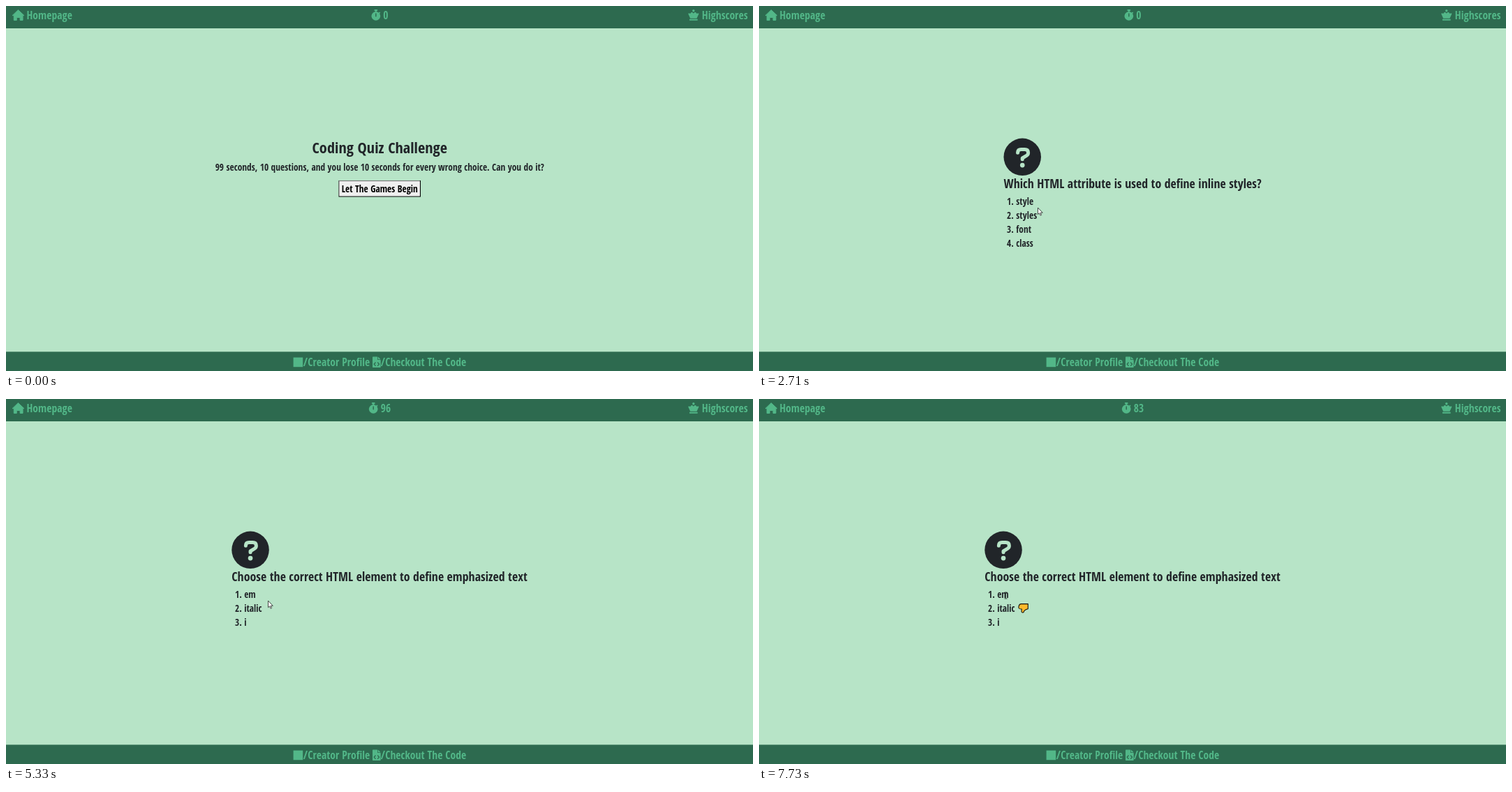
These frames come from a looping animation (1070 px wide and 523 px high, 8000 ms). An HTML page with a canvas:

```html
<!DOCTYPE html>
<html lang="en">
<head>
<meta charset="utf-8">
<title>Coding Quiz Challenge</title>
<style>
  html, body { margin: 0; width: 100%; height: 100%; overflow: hidden; background: #b7e4c7; }
  canvas { display: block; }
</style>
</head>
<body>
<canvas id="stage" width="1070" height="523"></canvas>
<script>
const ctx = document.getElementById("stage").getContext("2d");
const WIDTH = 1070, HEIGHT = 523, CENTER = WIDTH / 2 + .3;
const LOOP = 8000, BEGIN = 1740, SECOND = 993, NEXT_QUESTION = 4050, WRONG_ANSWER = 6070;
const REM = 16 * WIDTH / 1920;
const FAMILY = '"Open Sans Condensed", "Open Sans", "Noto Sans", sans-serif';
const MINT = "#b7e4c7", PINE = "#2d6a4f", LEAF = "#52b788", INK = "#212529";
const LIST_TOP = 269.7, ROW = 2.25 * REM, INDENT = 2 * REM;

const questions = [
  { x: 350.5, text: "Which HTML attribute is used to define inline styles?", items: ["style", "styles", "font", "class"] },
  { x: 323.3, text: "Choose the correct HTML element to define emphasized text", items: ["em", "italic", "i"] }
];

// Each trip bends towards a point, ends at a stop and clicks there
const entry = [929, 486];
const trips = [
  { from: 120, to: 1000, bend: [621, 403], stop: [571, 263], click: 1650 },
  { from: 2200, to: 2980, bend: [418, 306], stop: [386, 284], click: 3450 },
  { from: 5120, to: 5870, bend: [371, 292], stop: [357, 299], click: 6000 },
  { from: 6740, to: 7180, bend: [355, 290], stop: [353.5, 281.5], click: 7380 }
];

function setFont(rem) {
  ctx.font = `condensed 700 ${rem * REM}px ${FAMILY}`;
  ctx.fontStretch = "condensed";
  ctx.letterSpacing = ".04px";
}

function label(text, x, y, rem, color, align = "left") {
  setFont(rem);
  ctx.fillStyle = color;
  ctx.textAlign = align;
  ctx.fillText(text, x, y);
}

function textWidth(text, rem) {
  setFont(rem);
  return ctx.measureText(text).width;
}

function rect(x, y, w, h, color) {
  ctx.fillStyle = color;
  ctx.fillRect(x, y, w, h);
}

function disc(x, y, r, color) {
  ctx.fillStyle = color;
  ctx.beginPath();
  ctx.arc(x, y, r, 0, 2 * Math.PI);
  ctx.fill();
}

function fill(path, color) {
  ctx.fillStyle = color;
  ctx.fill(new Path2D(path));
}

function stroke(path, color, width) {
  ctx.strokeStyle = color;
  ctx.lineWidth = width;
  ctx.lineCap = ctx.lineJoin = "round";
  ctx.stroke(new Path2D(path));
}

function outlined(path, color, edge, width) {
  fill(path, color);
  stroke(path, edge, width);
}

function at(x, y, scale, draw) {
  ctx.save();
  ctx.translate(x, y);
  ctx.scale(scale, scale);
  draw();
  ctx.restore();
}

// Icons are drawn on a 512 unit em square
const icon = (draw, x, y, rem = 1.75) => at(x, y, rem * REM / 512, draw);

function house() {
  outlined("M288 18 L558 272 H498 V496 H368 V368 H208 V496 H78 V272 H18 Z", LEAF, LEAF, 32);
}

function stopwatch() {
  stroke("M176 32 H272 M224 32 V120 M350 190 L396 148", LEAF, 64);
  disc(224, 304, 208, LEAF);
  stroke("M224 192 V320", PINE, 48);
}

function queen() {
  disc(256, 56, 56, LEAF);
  fill("M104 416 L4 195 L46 168 Q128 220 148 128 H204 Q256 224 308 128 H364 Q384 220 466 168 L508 195 L408 416 Z", LEAF);
  rect(64, 448, 384, 64, LEAF);
}

function codeFile() {
  outlined("M24 24 H208 V176 H360 V488 H24 Z", LEAF, LEAF, 48);
  fill("M256 0 L384 128 H256 Z", LEAF);
  stroke("M136 280 L72 352 L136 424 M248 280 L312 352 L248 424", PINE, 44);
}

function questionMark() {
  disc(256, 256, 256, INK);
  stroke("M192 198 Q192 152 238 152 H289 Q336 152 336 198 Q336 224 313 238 L256 272 V288", MINT, 48);
  disc(256, 368, 32, MINT);
}

function drawBars(seconds) {
  rect(0, 0, WIDTH, 32, PINE);
  rect(0, 495.4, WIDTH, HEIGHT, PINE);
  icon(house, 8.9, 5.3);
  label("Homepage", 29.4, 19.2, 1.75, LEAF);
  const left = CENTER - (ICON_GAP + textWidth(seconds, 1.75)) / 2;
  icon(stopwatch, left, 5.1);
  label(seconds, left + ICON_GAP, 19.2, 1.75, LEAF);
  icon(queen, 977, 5.1);
  label("Highscores", 1062.5, 19.2, 1.75, LEAF, "right");
  rect(411.6, 503.6, 13.6, 13.6, LEAF);
  label("/Creator Profile", 425.8, 516.2, 1.75, LEAF);
  icon(codeFile, 525, 502.4);
  label("/Checkout The Code", 536.8, 516.2, 1.75, LEAF);
}
const ICON_GAP = 17.3;

function drawStart() {
  label("Coding Quiz Challenge", CENTER, 210.9, 2.5, INK, "center");
  label("99 seconds, 10 questions, and you lose 10 seconds for every wrong choice. Can you do it?",
    CENTER, 236, 1.5, INK, "center");
  rect(476.5, 250, 117.5, 23.5, "#000");
  rect(476.5, 250, 116.4, 22.4, "#767676");
  rect(477.6, 251.1, 115.3, 21.3, "#efefef");
  label("Let The Games Begin", CENTER, 267, 1.5, "#000", "center");
}

function drawQuestion({ x, text, items }) {
  icon(questionMark, x, 189.6, 6);
  label(text, x, 261, 2, INK);
  items.forEach((item, i) => {
    const y = LIST_TOP + 15 + i * ROW;
    label(`${i + 1}. `, x + INDENT, y, 1.5, INK, "right");
    label(item, x + INDENT, y, 1.5, INK);
  });
}

function drawThumbDown() {
  outlined("M14 .6 H4 Q.6 1 .6 6 Q1 8 5 8 L4.7 11 Q5 14 7.8 12.5 Q8.5 9 14 7.8 Z", "#fdb92c", "#15130d", 1.1);
}

function pointerAt(t) {
  let position = entry;
  for (const { from, to, bend, stop } of trips) {
    if (t < from) break;
    const left = Math.max(0, (to - t) / (to - from)) ** 2;
    const done = 1 - left;
    position = position.map((p, i) => left * left * p + 2 * left * done * bend[i] + done * done * stop[i]);
  }
  return position;
}

function overText(x, y, question) {
  if (y > 243.8 && y < 265.2)
    return x > question.x && x < question.x + textWidth(question.text, 2);
  const item = question.items[Math.floor((y - LIST_TOP) / ROW)];
  const left = question.x + INDENT;
  return !!item && x > left && x < left + textWidth(item, 1.5);
}

function drawArrow() {
  outlined("M0 0 V9.2 L2.1 7.3 L3.6 10.7 L5.1 10 L3.6 6.8 H6.4 Z", "#fff", "#222", .8);
}

function drawHand() {
  outlined("M-1 1 Q0 -.6 1 1 V5 L5 6 Q6.7 6 6.7 8 L5.7 12.3 H.2 L-3.4 7.9 Q-3 6 -1 7.5 Z", "#fff", "#222", .8);
}

function drawBeam() {
  stroke("M-1.8 -4.5 H1.8 M0 -4.5 V4.5 M-1.8 4.5 H1.8", "rgba(20,30,25,.8)", .8);
}

function pointerShape(x, y, question) {
  if (question) return overText(x, y, question) ? drawBeam : drawArrow;
  const onButton = Math.abs(x - CENTER) < 59 && Math.abs(y - 261.7) < 12;
  return onButton ? drawHand : drawArrow;
}

function drawPointer(t, question) {
  const step = 1000 / 15;
  const [x, y] = pointerAt(Math.floor(t / step) * step);
  if (trips.some(({ click }) => t >= click && t < click + 70)) disc(x, y, 6.7, "rgba(255,255,0,.47)");
  at(x, y, 1, pointerShape(x, y, question));
}

function secondsLeft(t) {
  const passed = Math.floor((t - BEGIN) / SECOND);
  if (passed < 1) return 0;
  const penalty = BEGIN + passed * SECOND > WRONG_ANSWER ? 10 : 0;
  return 99 - passed - penalty;
}

function render(t) {
  const question = t < BEGIN ? null : questions[t < NEXT_QUESTION ? 0 : 1];
  rect(0, 0, WIDTH, HEIGHT, MINT);
  drawBars(secondsLeft(t));
  if (question) drawQuestion(question);
  else drawStart();
  if (t >= WRONG_ANSWER) at(371.3, 293, 1, drawThumbDown);
  if (t >= trips[0].from) drawPointer(t, question);
}

const start = performance.now();
function loop() {
  render((performance.now() - start) % LOOP);
  requestAnimationFrame(loop);
}
loop();
</script>
</body>
</html>
```
